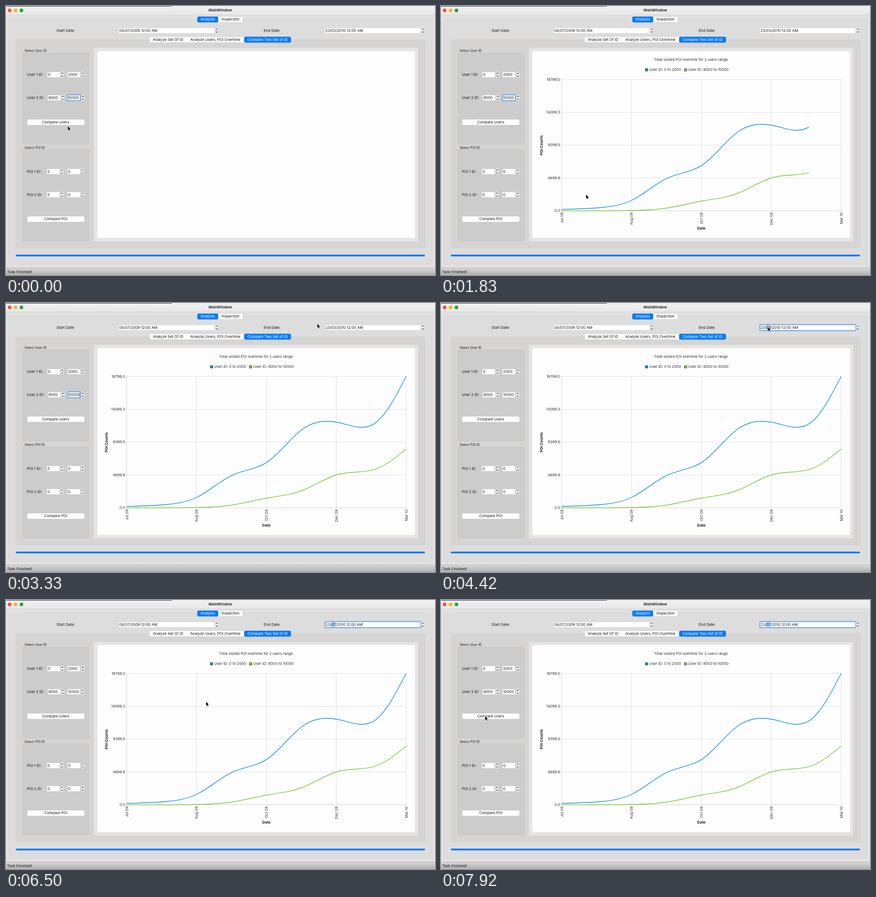
Animation of 944x593 px, one loop 8000 ms. Source, as an HTML page with a canvas:

```html
<!DOCTYPE html>
<html lang="en">
<head>
<meta charset="utf-8">
<title>MainWindow</title>
<style>
  html, body { margin: 0; width: 100%; height: 100%; overflow: hidden; background: #e2e1e1; }
  canvas { display: block; width: 944px; height: 593px; }
</style>
</head>
<body>
<canvas id="stage" width="944" height="593"></canvas>
<script>
const W = 944, H = 593, LOOP = 8000;
const ctx = document.getElementById('stage').getContext('2d');
const ACCENT = '#067bfb', INK = '#161616', BLUE = '#0b8fd6', GREEN = '#7ac331';
const FONT = 'Inter, "Open Sans", sans-serif';

// Timeline, ms
const BUSY = 500, CHART = 830, REVEAL = 900, REVEAL_TIME = 1000, FOCUS_DATE = 4250;
const MONTH_CLICKS = [5330, 5500, 5750, 6080];
const PRESSES = [[420, 500], [7660, 7830]];

// Pointer: time, x, y
const POINTER = [
  [0, 136, 265], [80, 136, 265], [250, 137, 259], [750, 137, 259],
  [920, 148, 140], [1200, 172, 215], [1580, 285, 444], [1830, 319, 416],
  [2420, 470, 341], [3250, 685, 46], [3330, 685, 46], [4080, 719, 53],
  [4750, 719, 53], [5200, 930, 47], [5330, 914, 48], [6080, 914, 48],
  [6830, 70, 362], [7330, 97, 260], [7580, 97, 260], [7750, 97, 256], [8000, 97, 256]
];

const PLOT = { l: 265.5, r: 880.5, t: 162, b: 451.5 };
const DAYS = [0, 31, 62, 92, 123, 153, 184, 215, 243];
const toPoints = ys => ys.map((y, i) => [PLOT.l + (PLOT.r - PLOT.l) * DAYS[i] / 243, y]);
const series = [
  { color: BLUE, pts: toPoints([448.5, 445, 427, 379.3, 349.3, 278, 263.5, 266.6, 162]) },
  { color: GREEN, pts: toPoints([451.5, 451.5, 450.8, 445.2, 429.5, 413, 377.7, 367.3, 322]) }
];
series.forEach(s => { s.ctrl = controls(s.pts); });

// Bezier handles of a natural cubic spline
function controls(p) {
  const n = p.length - 1;
  const solve = k => {
    const v = p.map(q => q[k]), f = [], c = [];
    let b = 2;
    f[0] = (v[0] + 2 * v[1]) / b;
    for (let i = 1; i < n; i++) {
      const rhs = i < n - 1 ? 4 * v[i] + 2 * v[i + 1] : (8 * v[i] + v[n]) / 2;
      c[i] = 1 / b;
      b = (i < n - 1 ? 4 : 3.5) - c[i];
      f[i] = (rhs - f[i - 1]) / b;
    }
    for (let i = n - 1; i > 0; i--) f[i - 1] -= c[i] * f[i];
    return f.map((a, i) => [a, i < n - 1 ? 2 * v[i + 1] - f[i + 1] : (v[n] + a) / 2]);
  };
  const xs = solve(0), ys = solve(1);
  return xs.map((x, i) => [x[0], ys[i][0], x[1], ys[i][1]]);
}

function box(x, y, w, h, fill, r = 0, stroke) {
  ctx.beginPath();
  ctx.roundRect(x, y, w, h, r);
  ctx.fillStyle = fill;
  ctx.fill();
  if (stroke) {
    ctx.strokeStyle = stroke;
    ctx.lineWidth = 0.7;
    ctx.stroke();
  }
}

function text(s, x, y, { align = 'left', size = 8.1, weight = 400, color = INK } = {}) {
  ctx.font = `${weight} ${size}px ${FONT}`;
  ctx.textAlign = align;
  ctx.textBaseline = 'middle';
  ctx.fillStyle = color;
  ctx.fillText(s, x, y);
}

function turned(s, x, y, opts) {
  ctx.save();
  ctx.translate(x, y);
  ctx.rotate(-Math.PI / 2);
  text(s, 0, 0, opts);
  ctx.restore();
}

function line(pts, color, width) {
  ctx.beginPath();
  pts.forEach(([x, y]) => ctx.lineTo(x, y));
  ctx.strokeStyle = color;
  ctx.lineWidth = width;
  ctx.stroke();
}

function gradient(y, h, from, to) {
  const g = ctx.createLinearGradient(0, y, 0, y + h);
  g.addColorStop(0, from);
  g.addColorStop(1, to);
  box(0, y, W, h, g);
}

function stepper(x, y) {
  box(x - 3.5, y - 6.5, 7, 13, '#fdfdfd', 2.5, '#c6c5c5');
  for (const d of [-1, 1]) {
    line([[x - 2, y + d * 2], [x, y + d * 4.2], [x + 2, y + d * 2]], '#222', 1.1);
  }
}

function field(x, y, w, value) {
  box(x, y - 6, w, 12, '#fefefe', 0, '#cfcece');
  text(value, x + 1.5, y + 0.3);
}

function ring(x, y, w, h) {
  ctx.beginPath();
  ctx.roundRect(x, y, w, h, 2);
  ctx.strokeStyle = '#6aa5ea';
  ctx.lineWidth = 2;
  ctx.stroke();
}

function spinRow(label, y, x, first, second) {
  text(label, 46, y + 0.3);
  field(x, y, 28, first);
  stepper(x + 33, y);
  field(135.3, y, 28, second);
  stepper(169, y);
}

function button(label, y, pressed) {
  box(46.5, y - 6.5, 126.5, 13, pressed ? '#e9e9e9' : '#fefefe', 3, '#c3c2c2');
  text(label, 109.5, y, { align: 'center' });
}

function tabs(y, list) {
  const x0 = list[0][1], x1 = list[list.length - 1][2];
  box(x0, y - 6.5, x1 - x0, 13, '#fdfdfd', 3, '#c9c8c8');
  list.forEach(([label, l, r, on], i) => {
    if (on) box(l, y - 6.5, r - l, 13, ACCENT, 3);
    else if (i && !list[i - 1][3]) line([[l, y - 4], [l, y + 4]], '#d8d8d8', 0.8);
    text(label, (l + r) / 2, y + 0.3, { align: 'center', color: on ? '#fff' : INK });
  });
}

function windowFrame(t) {
  box(0, 0, W, H, '#e2e1e1');
  gradient(0, 19, '#f1f0f1', '#e9e8e9');
  box(0, 19, W, 0.8, '#d2d1d1');
  box(0, 0, 365, 1, '#1d2d3f');
  ['#fc4b48', '#fdb225', '#20a83a'].forEach((c, i) => {
    ctx.beginPath();
    ctx.arc(8 + 13 * i, 9.7, 4, 0, 7);
    ctx.fillStyle = c;
    ctx.fill();
  });
  text('MainWindow', 471.5, 9.5, { align: 'center', weight: 700, color: '#333' });

  box(6.5, 28.5, 930.5, 541, '#dedddd', 3, '#d5d4d4');
  box(21.5, 74.5, 900.5, 458.5, '#d6d5d4', 3, '#cecdcd');
  tabs(29.7, [['Analysis', 421, 467, true], ['Inspection', 467, 521]]);
  tabs(74.2, [['Analyze Set Of ID', 316, 397], ['Analyze Users, POI Overtime', 397, 524],
    ['Compare Two Set of ID', 524, 627, true]]);

  const busy = t >= BUSY && t < CHART;
  box(21.5, 548, 900.5, 4, busy ? '#c8c7c7' : ACCENT, 2);
  gradient(577, 16, '#dad9d9', '#b1b0b0');
  box(0, 577, W, 1, '#b5b4b4');
  text(busy ? 'Task Running...' : 'Task Finished!', 2.5, 586.7);
}

function dates(t) {
  text('Start Date:', 111, 54.6);
  field(247.5, 54.2, 211.5, '04/07/2009 12:00 AM');
  stepper(464, 54.2);
  text('End Date:', 567, 54.6);

  const month = 3 + MONTH_CLICKS.filter(c => t >= c).length;
  const mm = '0' + month;
  field(701.5, 54.2, 211, '');
  if (t >= FOCUS_DATE) {
    ctx.font = `400 8.1px ${FONT}`;
    box(703 + ctx.measureText('23/').width, 49, ctx.measureText(mm).width, 10.5, '#a9cffb');
    ring(701.5, 47.5, 211.5, 13.5);
  }
  text(`23/${mm}/2010 12:00 AM`, 703, 54.5);
  stepper(917.3, 54.2);
}

function sidePanel(t) {
  const pressed = PRESSES.some(([a, b]) => t >= a && t < b);
  text('Select User ID', 41, 99, { size: 7.2 });
  box(36.5, 103.5, 146.5, 201, '#cdcccc', 2, '#c5c4c4');
  spinRow('User 1 ID:', 151.3, 91, '0', '2000');
  spinRow('User 2 ID:', 202.3, 92, '8000', '10000');
  if (t < FOCUS_DATE) {
    ring(135.5, 195.8, 28.5, 13);
    if (t >= 120 && (t - 120) % 1000 < 500) line([[161.5, 198], [161.5, 207]], '#111', 0.8);
  }
  button('Compare Users', 256.3, pressed);

  text('Select POI ID', 41, 312.5, { size: 7.2 });
  box(36.5, 317, 146.5, 201.5, '#cdcccc', 2, '#c5c4c4');
  spinRow('POI 1 ID:', 365, 90, '0', '0');
  spinRow('POI 2 ID:', 416, 90, '0', '0');
  button('Compare POI', 469.8, false);
}

function curve({ pts, ctrl, color }, count) {
  if (count < 2) return;
  ctx.beginPath();
  ctx.moveTo(...pts[0]);
  for (let i = 1; i < count; i++) ctx.bezierCurveTo(...ctrl[i - 1], ...pts[i]);
  ctx.strokeStyle = color;
  ctx.lineWidth = 1.4;
  ctx.lineJoin = 'round';
  ctx.stroke();
}

function chart(t) {
  box(193.5, 92.5, 713.5, 426.5, '#e6e5e4');
  box(201, 99.5, 699, 412, '#fefdfe', 4);
  if (t < CHART) return;

  const ink = { color: '#303030' };
  text('Total visited POI overtime for 2 users range', 550, 118.5, { ...ink, align: 'center', size: 7.95 });
  box(449.5, 138, 5.5, 5.5, BLUE, 0, '#222');
  text('User ID: 0 to 2000', 458, 140.8, ink);
  box(535.5, 138, 5.5, 5.5, GREEN, 0, '#222');
  text('User ID: 8000 to 10000', 544, 140.8, ink);

  const months = ['Jul 09', 'Aug 09', 'Oct 09', 'Dec 09', 'Mar 10'];
  const values = ['18799.0', '14099.3', '9399.5', '4699.8', '0.0'];
  for (let i = 0; i < 5; i++) {
    const x = PLOT.l + (PLOT.r - PLOT.l) * i / 4;
    const y = PLOT.t + (PLOT.b - PLOT.t) * i / 4;
    line([[x, PLOT.t], [x, PLOT.b + 3]], i ? '#dddfe3' : '#cfd1d5', 1);
    line([[PLOT.l - 3, y], [PLOT.r, y]], i < 4 ? '#dddfe3' : '#cfd1d5', 1);
    text(values[i], 262, y + 0.3, { ...ink, align: 'right' });
    turned(months[i], x + 0.8, 455, { ...ink, align: 'right' });
  }
  const bold = { color: '#222', align: 'center', weight: 700 };
  turned('POI Counts', 222, 307, bold);
  text('Date', 573, 491, bold);

  // Quartic ease-out, revealing whole segments
  const p = Math.min(1, Math.max(0, (t - REVEAL) / REVEAL_TIME));
  const count = Math.floor(DAYS.length * (1 - (1 - p) ** 4));
  series.forEach(s => curve(s, count));
}

function pointer(t) {
  const i = Math.max(1, POINTER.findIndex(k => k[0] > t));
  const [t0, x0, y0] = POINTER[i - 1], [t1, x1, y1] = POINTER[i];
  const u = (t - t0) / (t1 - t0);
  ctx.save();
  ctx.translate(x0 + (x1 - x0) * u, y0 + (y1 - y0) * u);
  ctx.beginPath();
  [[0, 0], [0, 8.8], [2, 7], [3.4, 10.2], [4.9, 9.5], [3.5, 6.5], [6.2, 6.3]]
    .forEach(([x, y]) => ctx.lineTo(x, y));
  ctx.closePath();
  ctx.lineJoin = 'round';
  ctx.strokeStyle = '#fff';
  ctx.lineWidth = 1.2;
  ctx.stroke();
  ctx.fillStyle = '#0a0a0a';
  ctx.fill();
  ctx.restore();
}

function draw(t) {
  windowFrame(t);
  dates(t);
  sidePanel(t);
  chart(t);
  pointer(t);
}

const start = performance.now();
function tick() {
  draw((performance.now() - start) % LOOP);
  requestAnimationFrame(tick);
}
tick();
</script>
</body>
</html>
```
